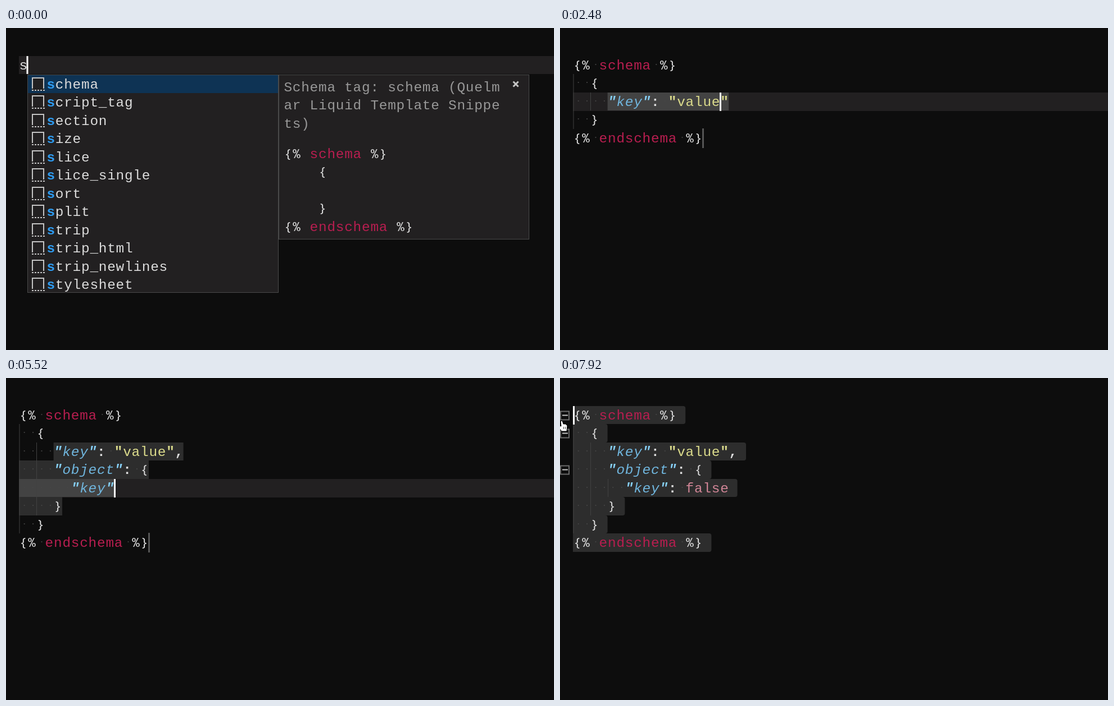
An HTML page with a canvas that plays this animation: 975x574 px, repeating every 8000 ms.

```html
<!DOCTYPE html>
<html lang="en">
<head>
<meta charset="utf-8">
<title>Snippet typing</title>
<style>
html, body { margin: 0; width: 100%; height: 100%; overflow: hidden; background: #0d0d0d; }
canvas { display: block; }
</style>
</head>
<body>
<canvas id="stage" width="975" height="574"></canvas>
<script>
const ctx = document.getElementById('stage').getContext('2d');
const LOOP = 8000, TICK = 80, CELL = 15.4, LINE = 32.45, LEFT = 23, TOP = 50;
const OPEN = 160, DRAG = 7440, DRAG_END = 7840;
const MONO = '24.4px "Liberation Mono", "Courier New", monospace';
const THIN = '300 22.5px "Noto Sans Mono", monospace';
const C = {
  bg: '#0d0d0d', row: '#222021', range: '#2d2d2d', active: '#434343', edge: '#4a4a4a',
  guide: '#424242', dot: '#474747', text: '#dcdcdc', tag: '#b81e50', key: '#70b6de',
  keyQuote: '#86cff5', value: '#dcdc8c', bool: '#d08596', dim: '#989898', icon: '#c5c5c5'
};
const START = ['{% schema %}', '  {', '    ', '  }', '{% endschema %}'];
const ITEMS = ['schema', 'script_tag', 'section', 'size', 'slice', 'slice_single', 'sort',
  'split', 'strip', 'strip_html', 'strip_newlines', 'stylesheet'];

// Typing bursts: start time, time per key, keys
const BURSTS = [
  [880, 120, '"key": "'], [1840, 140, 'value'], [2560, 240, '",\n'],
  [3120, 110, '"object"'], [4160, 160, ': {\n'], [4880, 140, '"key"'], [5680, 93, ': false']
];

const colX = c => LEFT + c * CELL;
const rowY = r => Math.round(TOP + r * LINE);
const indentOf = s => s.match(/^ */)[0].length;

function box(x, y, w, h, color) {
  ctx.fillStyle = color;
  ctx.fillRect(x, y, w, h);
}

function frame(x, y, w, h) {
  box(x, y, w, h, C.edge);
  box(x + 1, y + 1, w - 2, h - 2, C.row);
}

function trace(points) {
  ctx.beginPath();
  points.forEach(([x, y]) => ctx.lineTo(x, y));
}

// One character per cell, centred; y is the baseline
function put(text, x, y, color, style = '') {
  ctx.fillStyle = color;
  ctx.textAlign = 'center';
  [...text].forEach((ch, i) => {
    ctx.font = '{}%'.includes(ch) ? THIN : style + ' ' + MONO;
    ctx.fillText(ch, x + (i + 0.5) * CELL, y);
  });
}

function putCode(line, x, y) {
  for (const m of line.matchAll(/"[^"]*"?|[a-z]+|[^\sa-z"]/g)) {
    const s = m[0], at = x + m.index * CELL;
    if (s[0] === '"') {
      const isKey = !line.slice(0, m.index).includes(':');
      const slant = isKey ? 'italic' : '';
      put(s.replace(/"/g, ' '), at, y, isKey ? C.key : C.value, slant);
      put(s.replace(/[^"]/g, ' '), at, y, isKey ? C.keyQuote : C.value, slant + ' bold');
    } else if (/[a-z]/.test(s)) {
      put(s, at, y, s === 'false' ? C.bool : s.endsWith('schema') ? C.tag : C.text);
    } else {
      put(s, at, y, C.text, 'bold');
    }
  }
}

function type(doc, key) {
  const line = doc.lines[doc.row];
  const before = line.slice(0, doc.col), after = line.slice(doc.col);
  if (key === '\n') {
    const pad = ' '.repeat(indentOf(line));
    if (after[0] === '}') {
      doc.lines.splice(doc.row, 1, before, pad + '  ', pad + after);
      doc.col = pad.length + 2;
    } else {
      doc.lines.splice(doc.row, 1, before, pad + after);
      doc.col = pad.length;
    }
    doc.row++;
    return;
  }
  const pair = { '"': '""', '{': '{}' }[key] || key;
  if (key !== '"' || after[0] !== '"') doc.lines[doc.row] = before + pair + after;
  doc.col++;
}

function docAt(t) {
  const doc = { lines: [...START], row: 2, col: 4, last: OPEN };
  for (const [from, step, keys] of BURSTS) {
    [...keys].forEach((key, i) => {
      const at = from + i * step;
      if (at > t) return;
      type(doc, key);
      doc.last = at;
    });
  }
  return doc;
}

function caret(row, col) {
  box(Math.floor(colX(col)), rowY(row), 3, 33, '#fff');
}

function drawMenu() {
  box(LEFT, TOP, 952, 32, C.row);
  put('s', LEFT, 74, C.text);
  box(36.5, TOP, 3, 32, '#fff');

  frame(38, 83, 447, 389);
  box(39, 84, 445, 32, '#0e3354');
  ITEMS.forEach((name, i) => {
    const y = Math.round(i * LINE);
    box(46, y + 88, 22, 24, C.row);
    ctx.strokeStyle = C.icon;
    ctx.lineWidth = 2;
    trace([[47, y + 108], [47, y + 89], [67, y + 89], [67, y + 108]]);
    ctx.stroke();
    for (let k = 0; k < 5; k++) box(46 + k * 5, y + 110, 3, 2, C.icon);
    put('s', 72, y + 108, '#2e9bf0', 'bold');
    put(name.slice(1), 72 + CELL, y + 108, C.text);
  });

  frame(485, 83, 446, 294);
  ['Schema tag: schema (Quelm', 'ar Liquid Template Snippe', 'ts)'].forEach((s, i) =>
    put(s, 494, 113 + i * LINE, C.dim));
  ['{% schema %}', '    {', '', '    }', '{% endschema %}'].forEach((s, i) =>
    putCode(s, 494, 232 + i * LINE));
  ctx.strokeStyle = C.icon;
  ctx.lineWidth = 3;
  trace([[902.5, 95.5], [911.5, 104.5]]);
  ctx.stroke();
  trace([[911.5, 95.5], [902.5, 104.5]]);
  ctx.stroke();
}

function drawRange(doc) {
  box(LEFT, rowY(doc.row), 952, 33, C.row);
  for (let r = 2; r < doc.lines.length - 2; r++) {
    const x = r === 2 ? colX(4) : LEFT;
    box(x, rowY(r), colX(doc.lines[r].length) - x, rowY(r + 1) - rowY(r),
      r === doc.row ? C.active : C.range);
  }
}

function drawSelection(lines, first) {
  ctx.fillStyle = C.range;
  for (let r = first; r < lines.length; r++) {
    ctx.beginPath();
    ctx.roundRect(LEFT, rowY(r), colX(lines[r].length + 1) - LEFT, rowY(r + 1) - rowY(r), [0, 4, 4, 0]);
    ctx.fill();
  }
}

function drawLines(lines) {
  lines.forEach((line, r) => {
    const y = rowY(r), indent = line.trim() ? indentOf(line) : 2;
    for (let c = 0; c < indent; c += 2) {
      box(Math.round(colX(c)) + (c ? 0 : 0.5), y, 1, rowY(r + 1) - y, C.guide);
    }
    ctx.fillStyle = C.dot;
    [...line].forEach((ch, c) => {
      if (ch !== ' ') return;
      ctx.beginPath();
      ctx.arc(colX(c) + 9.7, y + 15, 1.1, 0, 7);
      ctx.fill();
    });
    putCode(line, LEFT, y + 24);
  });
}

function drawGutter(handY) {
  for (const r of [0, 1, 3]) {
    const y = rowY(r) + 8.5;
    ctx.strokeStyle = '#6b6b6b';
    ctx.lineWidth = 2;
    ctx.strokeRect(1, y + 1, 15, 15);
    box(4, y + 7, 10, 2, C.icon);
  }
  ctx.save();
  ctx.translate(0, handY);
  ctx.fillStyle = '#fff';
  ctx.strokeStyle = '#000';
  ctx.lineWidth = 1;
  trace([[1, -1], [4, -2], [6, 4], [10, 4], [13, 7], [12, 17], [3, 17], [-2, 11], [-2, 7], [2, 8]]);
  ctx.closePath();
  ctx.fill();
  ctx.stroke();
  box(6, 9, 1, 4, '#444');
  box(9, 9, 1, 4, '#444');
  ctx.restore();
}

function drawEditor(t) {
  const doc = docAt(t), { lines } = doc;
  if (t < DRAG) {
    drawRange(doc);
    drawLines(lines);
    const end = lines.length - 1;
    box(Math.floor(colX(15)) - 1, rowY(end) - 1, 3, 35, '#555');
    if ((t - doc.last) % 1000 < 500) caret(doc.row, doc.col);
    return;
  }
  const p = Math.min(1, (t - DRAG) / (DRAG_END - DRAG));
  const handY = 325 + (78 - 325) * p;
  const first = Math.min(lines.length - 1, Math.floor((handY - TOP) / LINE));
  drawSelection(lines, first);
  drawLines(lines);
  caret(first, 0);
  drawGutter(handY);
}

function draw(now) {
  const t = Math.floor(now % LOOP / TICK) * TICK;
  box(0, 0, 975, 574, C.bg);
  if (t < OPEN) drawMenu();
  else drawEditor(t);
  requestAnimationFrame(draw);
}
requestAnimationFrame(draw);
</script>
</body>
</html>
```
